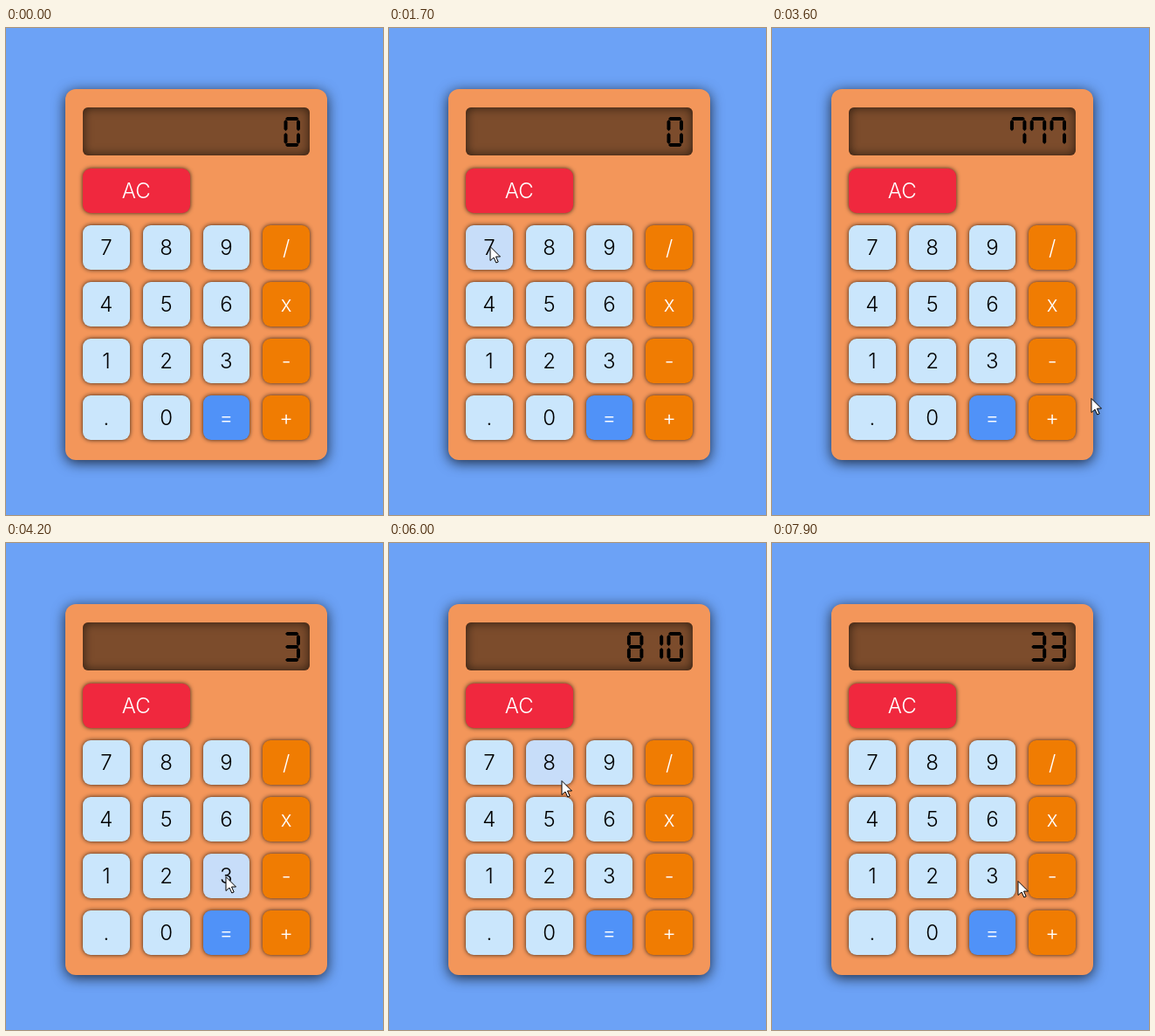
An HTML page that plays this animation: 432x558 px, repeating every 8 s.

```html
<!DOCTYPE html>
<html lang="en">
<head>
<meta charset="utf-8">
<title>Calculator</title>
<style>
  html, body { margin: 0; width: 100%; height: 100%; overflow: hidden; background: #6ca2f6; }
  body { font: 300 24px Inter, "Open Sans", sans-serif; }
  #case, #screen, #keys, svg { position: absolute; }
  #case { left: 68px; top: 70px; width: 300px; height: 425px; border-radius: 12px;
    background: #f3965a; box-shadow: 0 3px 15px rgba(0, 0, 0, .75); }
  #screen { left: 88px; top: 91px; width: 260px; height: 55px; border-radius: 6px;
    background: #7c4c2c; box-shadow: inset 0 0 12px rgba(0, 0, 0, .65); }
  #keys { left: 88px; top: 161px; width: 260px; display: grid; gap: 14px 15px;
    grid-template-columns: repeat(4, 1fr); grid-auto-rows: 51px; }
  .key { display: flex; align-items: center; justify-content: center;
    border-radius: 9px; box-shadow: 0 0 5px rgba(0, 0, 0, .8); color: #fff; }
  .ac { grid-column: 1 / 3; background: #f0283e; }
  .ac + .key { grid-column-start: 1; }
  .num { background: #cae6fc; color: #000; }
  .op { background: #f07c02; }
  .eq { background: #5092f8; }
  .ac.hover { background: #ee3c4e; }
  .num.hover { background: #c7ddf9; }
  .op.hover { background: #ef8014; }
  .eq.hover { background: #5f9bf7; }
  svg { left: 0; top: 0; }
</style>
</head>
<body>
<div id="case"></div>
<div id="screen"></div>
<div id="keys"></div>
<svg width="432" height="558">
  <path id="digits"/>
  <path id="cursor" d="M0 .5V16.5L4 13 6.8 19 9.2 18 6.5 12H11.5Z" fill="#fff" stroke="#000"/>
</svg>
<script>
const LOOP = 8000, STEP = 100;
const byId = id => document.getElementById(id);
const digits = byId('digits'), cursor = byId('cursor');

const keys = {};
['AC', ...'789/456x123-.0=+'].forEach(label => {
  const el = document.createElement('div');
  const kind = label === 'AC' ? 'ac' : label === '=' ? 'eq' : '/x-+'.includes(label) ? 'op' : 'num';
  el.className = 'key ' + kind;
  el.textContent = label;
  byId('keys').append(el);
  keys[label] = { el, box: el.getBoundingClientRect() };
});

// Seven-segment display
const bar = row => (x, y) => `M${x + 1.5} ${y + 2 + 15 * row}l2-2h11.5l2 2-2 2h-11.5z`;
const post = (col, row) => (x, y) => `M${x + 2 + 14.5 * col} ${y + 3 + 15 * row}l2 2v9l-2 2-2-2v-9z`;
const segments = {
  a: bar(0), g: bar(1), d: bar(2),
  f: post(0, 0), b: post(1, 0), e: post(0, 1), c: post(1, 1)
};
const lit = { 0: 'abcdef', 1: 'bc', 3: 'abcdg', 7: 'abcf', 8: 'abcdefg' };

const digitPath = text => [...text].reverse().map((c, i) =>
  [...lit[c]].map(s => segments[s](318.5 - i * 22.8, 102)).join('')).join('');

// The pointer's stops, and what the display reads after each press
const stops = [], readings = [{ t: 0, text: '0' }];
let text = '0', sum = 0, fresh = true;

function enter(t, label) {
  if (label === '+') {
    sum += +text;
    fresh = true;
  } else if (label === '=') {
    text = String(sum + +text);
    sum = 0;
    fresh = true;
  } else if (label === 'AC') {
    text = '0';
    sum = 0;
    fresh = true;
  } else {
    text = fresh ? label : text + label;
    fresh = false;
  }
  readings.push({ t, text });
}

function move(t, x, y) { stops.push({ t, x, y }); }

function hover(t, label) {
  const { box } = keys[label];
  move(t, box.x + box.width / 2, box.y + box.height / 2);
}

function press(t, label, times = 1) {
  hover(t - 100, label);
  for (let i = 0; i < times; i++) enter(t + i * 200, label);
  hover(t + times * 200 - 100, label);
}

hover(100, '+');
hover(500, '7');
hover(900, '.');
move(1300, 15, 400);
move(1700, 116, 250);
move(2200, 15, 300);
press(2900, '7', 3);
move(3600, 366, 424);
press(3800, '+');
press(4200, '3', 2);
move(5000, 324, 444);
press(5600, '=');
move(6000, 198, 272);
press(6500, 'AC');
move(7000, 257, 413);
press(7400, '3', 2);
move(7900, 282, 387);

function pointerAt(t) {
  const i = Math.max(1, stops.findIndex(s => s.t >= t));
  const a = stops[i - 1], b = stops[i];
  const u = Math.max(0, (t - a.t) / (b.t - a.t));
  const ease = u * u * (3 - 2 * u);
  return [a.x + (b.x - a.x) * ease, a.y + (b.y - a.y) * ease].map(Math.round);
}

function draw(t) {
  const visible = t >= stops[0].t;
  const [x, y] = pointerAt(t);
  cursor.setAttribute('visibility', visible ? 'visible' : 'hidden');
  cursor.setAttribute('transform', `translate(${x} ${y})`);
  for (const { el, box } of Object.values(keys)) {
    const inside = x >= box.left && x < box.right && y >= box.top && y < box.bottom;
    el.classList.toggle('hover', visible && inside);
  }
  digits.setAttribute('d', digitPath(readings.filter(r => r.t <= t).pop().text));
}

function tick() {
  draw(Math.floor(performance.now() % LOOP / STEP) * STEP);
  requestAnimationFrame(tick);
}
tick();
</script>
</body>
</html>
```
